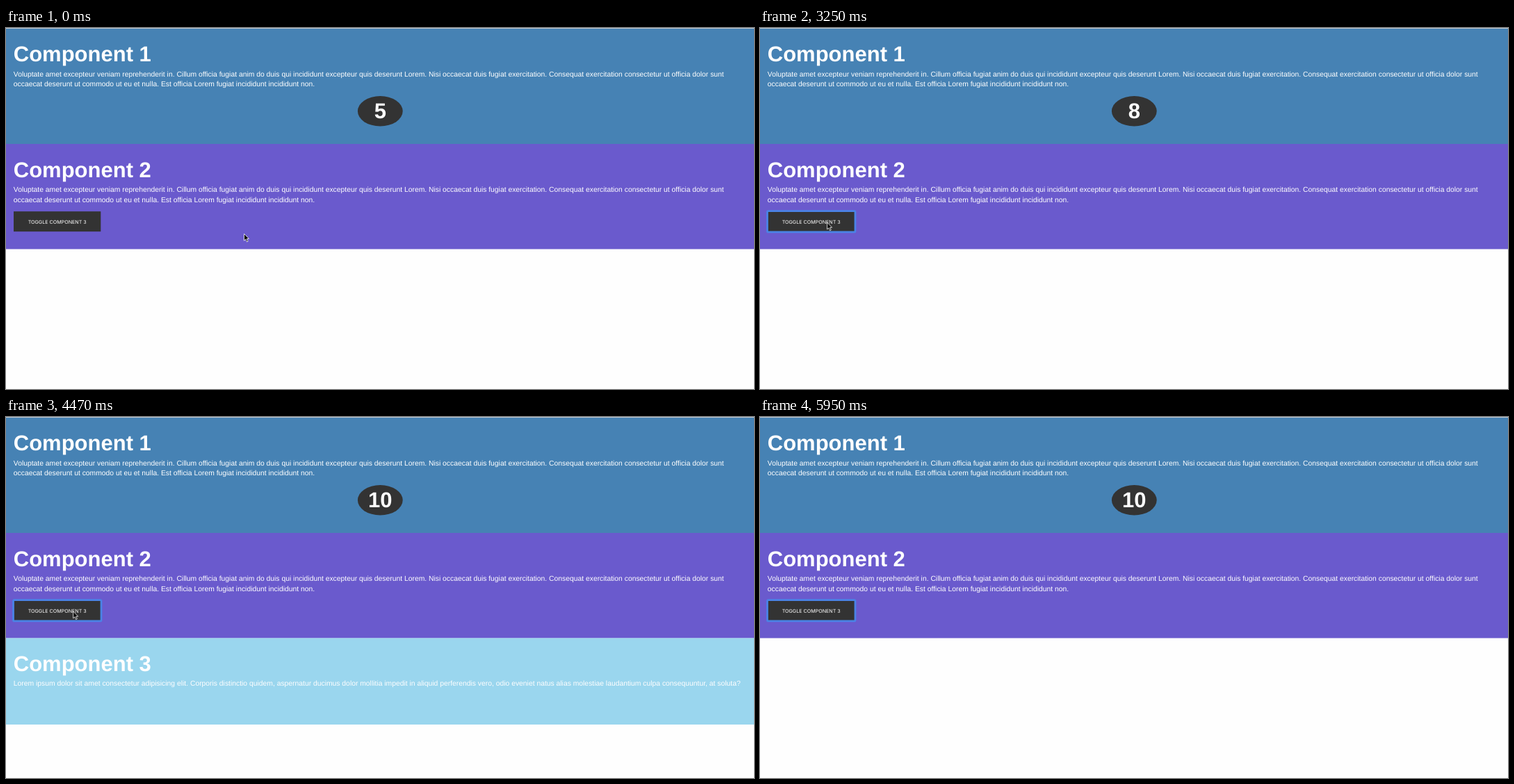
These frames come from a looping animation (1076x520 px, 6.25 s). An HTML page:

```html
<!DOCTYPE html>
<html lang="en">
<head>
<meta charset="utf-8">
<title>Toggle component</title>
<style>
  html, body { margin: 0; width: 100%; height: 100%; overflow: hidden; background: #fefefe; }
  svg { display: block; width: 1076px; height: 520px; }
  text { fill: #fff; font: 10.355px "Liberation Sans", Arial, sans-serif; text-rendering: geometricPrecision; }
  .title { font-size: 31px; font-weight: bold; }
  .middle { text-anchor: middle; }
  .label { font: 7.15px Inter, sans-serif; }
</style>
</head>
<body>
<svg viewBox="0 0 1076 520">
  <defs>
    <g id="copy">
      <text x="10.8" y="69.8">Voluptate amet excepteur veniam reprehenderit in. Cillum officia fugiat anim do duis qui incididunt excepteur quis deserunt Lorem. Nisi occaecat duis fugiat exercitation. Consequat exercitation consectetur ut officia dolor sunt</text>
      <text x="10.8" y="84">occaecat deserunt ut commodo ut eu et nulla. Est officia Lorem fugiat incididunt incididunt non.</text>
    </g>
  </defs>

  <rect width="1076" height="167" fill="#4682b4"/>
  <rect width="1076" height="1" fill="#c3cbd2"/>
  <text class="title" x="10.8" y="48.3">Component 1</text>
  <use href="#copy"/>
  <ellipse cx="538.3" cy="119.8" rx="32.4" ry="21.7" fill="#333"/>
  <text class="title middle" id="counter" x="538.3" y="130.4">5</text>

  <rect y="167" width="1076" height="151.5" fill="#6a5acd"/>
  <text class="title" x="10.8" y="215">Component 2</text>
  <use href="#copy" y="166.7"/>
  <rect x="11" y="264.2" width="125.3" height="29" fill="#333"/>
  <rect id="ring" x="10.5" y="263.6" width="126.5" height="30.3" rx="1.5" fill="none" stroke="#4a83e6" stroke-width="2.8"/>
  <text class="label middle" x="73.7" y="281.6">TOGGLE COMPONENT 3</text>

  <g id="panel">
    <rect y="318.5" width="1076" height="124.5" fill="#87ceeb"/>
    <text class="title" x="10.8" y="366.2">Component 3</text>
    <text x="10.8" y="387.4">Lorem ipsum dolor sit amet consectetur adipisicing elit. Corporis distinctio quidem, aspernatur ducimus dolor mollitia impedit in aliquid perferendis vero, odio eveniet natus alias molestiae laudantium culpa consequuntur, at soluta?</text>
  </g>

  <path id="cursor" d="M.5 .5V10.3L2.8 8.2 4.4 12 6.1 11.3 4.5 7.6H7.5Z" fill="#000" stroke="#fff" stroke-width=".8"/>
</svg>
<script>
const LOOP = 6250, STEP = 147;
const [counter, ring, panel, cursor] =
  ["counter", "ring", "panel", "cursor"].map(id => document.getElementById(id));

const show = (element, visible) => element.setAttribute("visibility", visible ? "visible" : "hidden");

// S-curve from 0 to 1, held between steps; it passes 0.5 after `half` steps.
function ease(elapsed, half, steepness) {
  const steps = Math.max(0, Math.floor(elapsed / STEP));
  return steps ** steepness / (steps ** steepness + half ** steepness);
}

function draw(time) {
  counter.textContent = Math.min(10, 5 + Math.floor((time + 530) / 980));
  show(ring, time >= 3250);

  const fadeIn = ease(time - 3243, 1.03, 5.3);
  const fadeOut = ease(time - 4323, 1.52, 3.8);
  panel.setAttribute("opacity", fadeIn * (1 - fadeOut));
  show(panel, time < 4860);

  // The pointer nears the button, settles on it, then leaves to the lower right.
  const approach = ease(time - 1440, 1.29, 4.3);
  const settle = ease(time - 2663, .9, 3);
  const leave = ease(time - 4893, 1.69, 2.9);
  const x = 342 - 254.5 * approach + 8.7 * settle + 934 * leave;
  const y = 296 - 8.5 * approach - 7.9 * settle + 220 * leave ** 2;
  cursor.setAttribute("transform", `translate(${x} ${y})`);
  show(cursor, time < 5950);
}

const begin = performance.now();
function tick() {
  draw((performance.now() - begin) % LOOP);
  requestAnimationFrame(tick);
}
tick();
</script>
</body>
</html>
```
